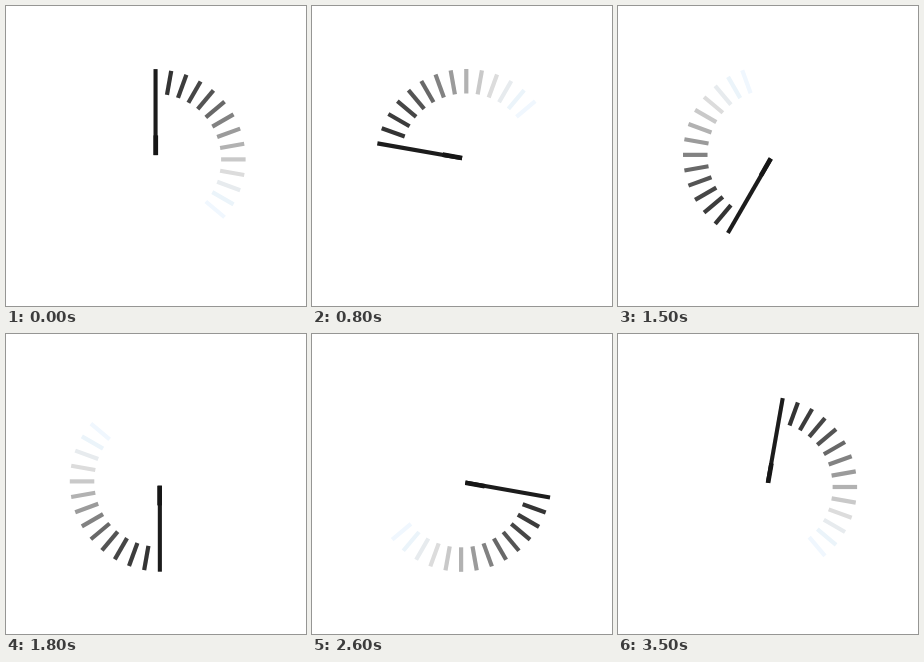
Animation, 300 px wide and 300 px high, one loop 3.6 s. Source, as an HTML page:

```html
<!DOCTYPE html>
<html lang="en">
<head>
<meta charset="utf-8">
<title>Spinner</title>
<style>
  html, body { margin: 0; width: 100%; height: 100%; overflow: hidden; background: #fff; }
  svg { display: block; width: 100vw; height: 100vh; }
</style>
</head>
<body>
<svg viewBox="0 0 300 300">
  <g id="dial"></g>
</svg>
<script>
const STEP_MS = 100;
const STEPS = 36;
const STEP_DEG = 360 / STEPS;
const PIVOT = { x: 151.7, y: 150.4 };
// The dial's own centre sits slightly off the pivot, so it wobbles as it turns.
const CENTER = { x: 149.6, y: 153.4 };
const INNER = 65.5;
const OUTER = 90;
const TICK_COLORS = [
  '#343434', '#3c3c3c', '#464646', '#545454', '#686868', '#828282', '#9b9b9b',
  '#b2b2b2', '#c9c9c9', '#dcdcdc', '#e7ebee', '#ebf4fa', '#f0f7fe'
];

const dial = document.getElementById('dial');

function addBar(angle, from, to, color, left, right) {
  const bar = document.createElementNS('http://www.w3.org/2000/svg', 'rect');
  const attributes = {
    x: CENTER.x - left,
    y: CENTER.y - to,
    width: left + right,
    height: to - from,
    fill: color,
    transform: `rotate(${angle} ${CENTER.x} ${CENTER.y})`
  };
  for (const name in attributes) bar.setAttribute(name, attributes[name]);
  dial.append(bar);
}

TICK_COLORS.forEach((color, i) => addBar((i + 1) * STEP_DEG, INNER, OUTER, color, 2.1, 2.1));
addBar(0, 4.3, OUTER + 0.3, '#1c1c1c', 2.1, 2);
addBar(0, 4.3, 24, '#161616', 2.1, 2.5);

function render(time) {
  const step = Math.floor(time / STEP_MS) % STEPS;
  dial.setAttribute('transform', `rotate(${-step * STEP_DEG} ${PIVOT.x} ${PIVOT.y})`);
}

const start = performance.now();
function tick() {
  render(performance.now() - start);
  requestAnimationFrame(tick);
}
tick();
</script>
</body>
</html>
```
